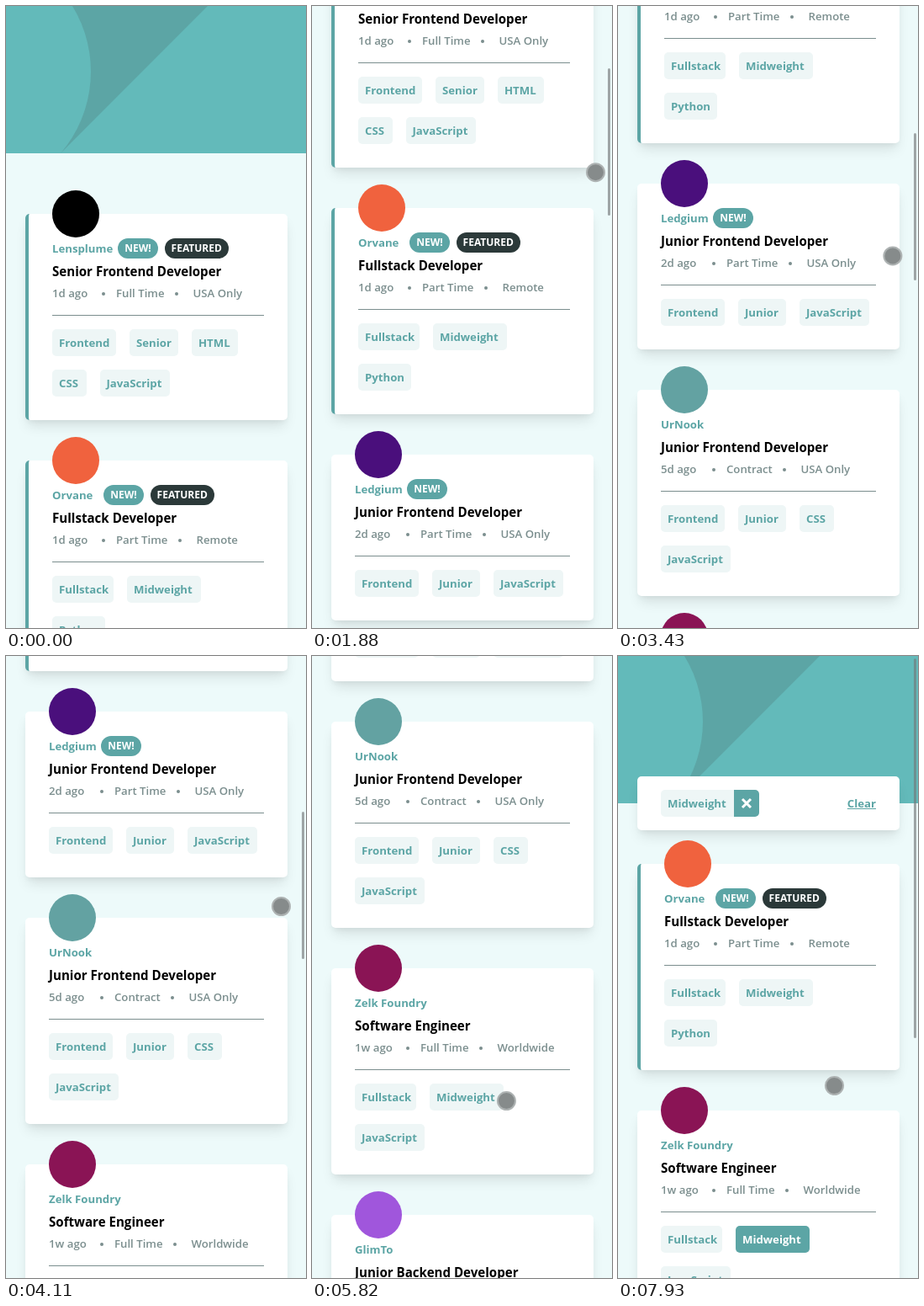
Write an HTML page that moves like this. It is 357 px wide and 739 px high and loops after 8 s.

```html
<!DOCTYPE html>
<html lang="en">
<head>
<meta charset="utf-8">
<title>Job listings</title>
<style>
  html, body { margin: 0; width: 100%; height: 100%; overflow: hidden; background: #edfafa; }
  body { position: relative; font: 700 13.2px/20px "Open Sans", "Noto Sans", sans-serif; color: #5ca5a5; }
  .page, .page > *, .card > *, #thumb, #cursor { position: absolute; }
  .page { left: 0; top: 0; width: 357px; }
  .page * { box-sizing: border-box; white-space: nowrap; }
  .banner { left: 0; top: 0; }
  .card, .filter {
    left: 23px; width: 312px; background: #fff; border-radius: 5px;
    box-shadow: 0 10px 15px -3px rgba(0,0,0,.1), 0 4px 6px -2px rgba(0,0,0,.05);
  }
  .featured { border-left: 4px solid #5ca5a5; }
  .logo { left: 28px; top: -28px; width: 56px; height: 56px; border-radius: 50%; }
  .name { left: 28px; top: 31px; }
  .badges { top: 29px; display: flex; gap: 8px; }
  .badge {
    width: 48px; height: 24px; border-radius: 12px; background: #5ca5a5;
    color: #fff; font-size: 12px; line-height: 24px; text-align: center;
  }
  .badge.dark { width: 75.5px; background: #2b3939; }
  .title { left: 28px; top: 58px; font-size: 15.1px; color: #000; }
  .meta { top: 84px; font-size: 13.2px; font-weight: 600; color: #7b8e8e; }
  .dot { top: 93px; width: 4px; height: 4px; border-radius: 50%; background: #7b8e8e; }
  .rule { left: 28px; right: 28px; top: 120px; height: 1px; background: #7b8e8e; }
  .tags { left: 28px; right: 28px; top: 137px; display: flex; flex-wrap: wrap; gap: 16px; }
  .tag { height: 32px; padding-left: 8px; border-radius: 5px; background: #eef6f6; line-height: 32px; }
  .tag.hover { background: #5ca5a5; color: #fff; }
  .filter { top: 143px; height: 64px; }
  .filter > * { position: absolute; }
  .filter .tag { left: 28px; top: 16px; width: 87px; border-radius: 5px 0 0 5px; }
  .filter svg { left: 115px; top: 16px; background: #5ca5a5; border-radius: 0 5px 5px 0; }
  .clear { right: 28px; top: 22px; text-decoration: underline; }
  #thumb { left: 352px; width: 3px; border-radius: 1.5px; background: rgba(115,120,122,.65); }
  #cursor {
    left: -11.5px; top: -11.5px; width: 23px; height: 23px; box-sizing: border-box;
    border-radius: 50%; background: #868b8b; border: 2.5px solid #adb2b2;
  }
</style>
</head>
<body>
<div class="page" id="all"></div>
<div class="page" id="filtered"></div>
<div id="thumb"></div>
<div id="cursor"></div>
<script>
const LOOP = 8000, VIEW = 739, PRESS = 6360, FILTER = 6430;
const HEIGHT_ALL = 3100, HEIGHT_FILTERED = 1204;

const tagWidth = { Frontend: 76, Senior: 58, HTML: 55, CSS: 40.5, JavaScript: 83, Fullstack: 73,
  Midweight: 88, Python: 63, Junior: 57, Backend: 74 };
const typeWidth = { 'Full Time': 57, 'Part Time': 61, Contract: 54 };

const job = (name, color, title, age, type, place, tags, rows, badgeX, featured) =>
  ({ name, color, title, age, type, place, tags: tags.split(' '), rows, badgeX, featured });

const frontend = 'Junior Frontend Developer';
const jobs = [
  job('Lensplume', '#000', 'Senior Frontend Developer', '1d ago', 'Full Time', 'USA Only',
    'Frontend Senior HTML CSS JavaScript', 2, 78, true),
  job('Orvane', '#f0623e', 'Fullstack Developer', '1d ago', 'Part Time', 'Remote',
    'Fullstack Midweight Python', 2, 61, true),
  job('Ledgium', '#4a0f7c', frontend, '2d ago', 'Part Time', 'USA Only', 'Frontend Junior JavaScript', 1, 62),
  job('UrNook', '#63a2a2', frontend, '5d ago', 'Contract', 'USA Only', 'Frontend Junior CSS JavaScript', 2),
  job('Zelk Foundry', '#8a1455', 'Software Engineer', '1w ago', 'Full Time', 'Worldwide',
    'Fullstack Midweight JavaScript', 2),
  job('GlimTo', '#a056dc', 'Junior Backend Developer', '2w ago', 'Full Time', 'USA Only', 'Backend Junior CSS', 1),
  job('Peblix Co.', '#d9a441', 'Fullstack Engineer', '3w ago', 'Full Time', 'Worldwide',
    'Fullstack Midweight JavaScript Python', 2)
];

const tagHtml = tag => `<div class="tag" data-tag="${tag}" style="width:${tagWidth[tag]}px">${tag}</div>`;

function cardHtml(j, top) {
  // The border makes a featured card narrower inside, which tightens its meta line.
  const typeX = j.featured ? 104 : 106;
  const dotX = typeX + typeWidth[j.type] + 15;
  const meta = (x, text) => `<div class="meta" style="left:${x}px">${text}</div>`;
  const dot = x => `<div class="dot" style="left:${x - 2}px"></div>`;
  const badges = j.badgeX ? `<div class="badges" style="left:${28 + j.badgeX}px"><div class="badge">NEW!</div>` +
    (j.featured ? '<div class="badge dark">FEATURED</div>' : '') + '</div>' : '';
  return `<div class="card ${j.featured ? 'featured' : ''}" style="top:${top}px;height:${149 + 48 * j.rows}px">
    <div class="logo" style="background:${j.color}"></div>
    <div class="name">${j.name}</div>${badges}
    <div class="title">${j.title}</div>
    ${meta(28, j.age)}${dot(typeX - 15)}${meta(typeX, j.type)}${dot(dotX)}${meta(dotX + 19.5, j.place)}
    <div class="rule"></div>
    <div class="tags">${j.tags.map(tagHtml).join('')}</div></div>`;
}

const banner = `<svg class="banner" width="357" height="175"><rect width="357" height="175" fill="#63baba"/>
  <path d="M79 0A149 149 0 0 1 65 175L240 0Z" fill="#5ca5a5"/></svg>`;
const filterBar = `<div class="filter"><div class="tag">Midweight</div>
  <svg width="30" height="32"><path d="M10 11l10 10m0-10l-10 10" stroke="#fff" stroke-width="3"/></svg>
  <div class="clear">Clear</div></div>`;

function pageHtml(list, extra = '') {
  let top = 247;
  return banner + extra + list.map(j => {
    const html = cardHtml(j, top);
    top += 197 + 48 * j.rows;
    return html;
  }).join('');
}

const $ = id => document.getElementById(id);
const all = $('all'), filtered = $('filtered'), thumb = $('thumb'), cursor = $('cursor');
all.innerHTML = pageHtml(jobs.slice(0, 6));
filtered.innerHTML = pageHtml(jobs.filter(j => j.tags.includes('Midweight')), filterBar);
const tagOf = (page, card) => page.querySelectorAll('.card')[card].querySelector('[data-tag=Midweight]');
const pressedTag = tagOf(all, 4);
tagOf(filtered, 1).classList.add('hover');

// Each wheel notch moves the page by 100px over 200ms.
const downNotches = [923, 1290, 1650, 2060, 2440, 3000, 3370, 3988, 4430, 4960];
const upNotches = [6850, 7040, 7230, 7420, 7610];
const NOTCH = 200;
const clamp = x => Math.min(1, Math.max(0, x));
const smooth = x => x * x * (3 - 2 * x);
const travel = (notches, t) => notches.reduce((sum, s) => sum + 100 * smooth(clamp((t - s) / NOTCH)), 0);

function barOpacity(t) {
  const last = Math.max(-1e4, ...[...downNotches, FILTER, ...upNotches].filter(s => s <= t));
  return 1 - clamp((t - last - NOTCH - 150) / 300);
}

// time, x, y
const cursorPath = [
  [720, 366, 120], [1000, 321, 173], [1470, 330, 186], [1880, 337, 197], [2290, 332, 250],
  [2680, 324, 294], [2880, 324, 294], [3570, 327, 297], [4920, 327, 297], [5250, 327, 310],
  [5750, 244, 511], [5820, 231, 528], [6020, 212, 541], [6830, 212, 541], [7300, 257, 510], [8000, 257, 510]
];

function cursorAt(t) {
  const i = cursorPath.findIndex(p => p[0] > t);
  const [t0, x0, y0] = cursorPath[i - 1], [t1, x1, y1] = cursorPath[i];
  const k = (t - t0) / (t1 - t0);
  return [x0 + (x1 - x0) * k, y0 + (y1 - y0) * k];
}

function draw(t) {
  const isFiltered = t >= FILTER;
  const height = isFiltered ? HEIGHT_FILTERED : HEIGHT_ALL;
  const scroll = isFiltered
    ? Math.max(0, HEIGHT_FILTERED - VIEW - travel(upNotches, t))
    : travel(downNotches, t);
  const page = isFiltered ? filtered : all;
  all.style.display = isFiltered ? 'none' : 'block';
  filtered.style.display = isFiltered ? 'block' : 'none';
  page.style.transform = `translateY(${-Math.round(scroll)}px)`;
  pressedTag.classList.toggle('hover', t >= PRESS);

  const track = VIEW - 4;
  thumb.style.top = 3 + scroll * track / height + 'px';
  thumb.style.height = track * VIEW / height + 'px';
  thumb.style.opacity = barOpacity(t);

  cursor.style.display = t < 720 ? 'none' : 'block';
  if (t >= 720) {
    const [x, y] = cursorAt(t);
    cursor.style.transform = `translate(${x}px,${y}px)`;
  }
}

const start = performance.now();
function tick() {
  draw((performance.now() - start) % LOOP);
  requestAnimationFrame(tick);
}
tick();
</script>
</body>
</html>
```
